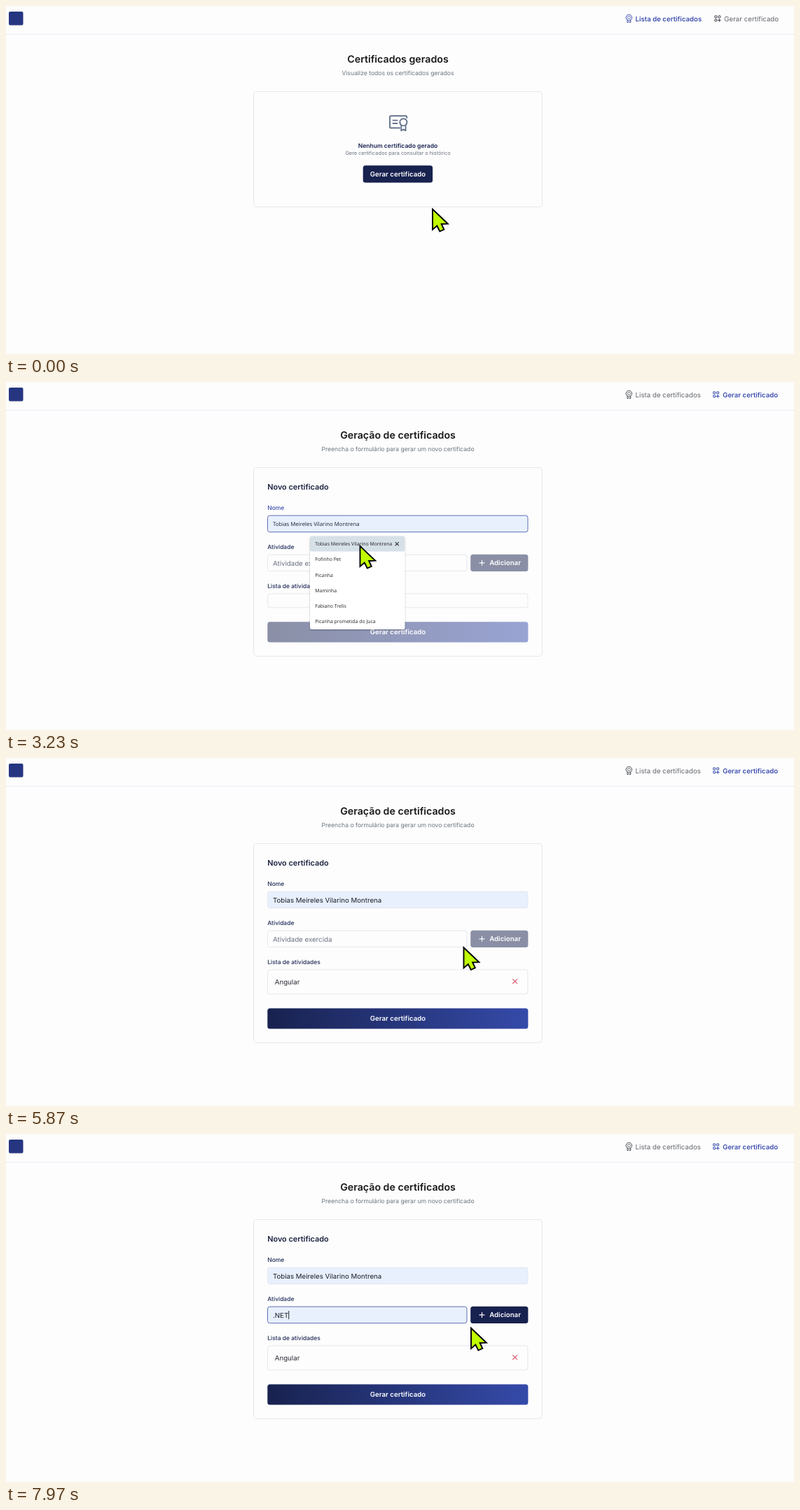
An HTML page that plays this animation: 1125 px wide and 498 px high, repeating every 8 s.

```html
<!DOCTYPE html>
<html lang="pt-BR">
<head>
<meta charset="utf-8">
<title>Certificados</title>
<style>
  html, body { margin: 0; width: 100%; height: 100%; overflow: hidden; background: #fdfdfd; }
  svg { display: block; width: 100vw; height: 100vh; }
  text { font-family: Inter, "Liberation Sans", sans-serif; text-rendering: geometricPrecision; white-space: pre; }
  .sys { font-family: "Open Sans", "Noto Sans", sans-serif; }
</style>
</head>
<body>
<svg id="stage" viewBox="0 0 1125 498" xmlns="http://www.w3.org/2000/svg"></svg>
<script>
const LOOP = 8000;
const NAVY = '#18224f', ACCENT = '#3f4fb0', GRAY = '#6b7280', BORDER = '#e5e7ee';
const STUDENT = 'Tobias Meireles Vilarino Montrena';
const STUDENTS = [STUDENT, 'Fofinho Pet', 'Picanha', 'Maminha', 'Fabiano Trelis', 'Picanha prometida do Juca'];
const ACTIVITIES = ['Angular', 'sa', 'asas', 'Nimbora', '.NET'];
const ROW = 22.1;

// Moments of the user's actions, in ms
const AT = {
  hover: 1380, page: 1600, nameFocus: 2530, namePick: 3530,
  firstFocus: 3680, firstPick: 4500, add: 4970,
  secondFocus: 6200, secondPick: 7830
};

// Pointer path: time, x, y
const PATH = [
  [0, 608.5, 290], [1270, 608.5, 290], [1430, 580.3, 231], [1700, 580.3, 231],
  [2100, 551.5, 209.5], [2900, 551.5, 209.5], [3230, 505, 234], [3530, 505, 234],
  [3680, 494, 258], [4000, 480, 262], [4130, 458.5, 278.5], [4200, 458.5, 278.5],
  [4300, 462, 284], [4510, 462, 284], [4830, 703, 257], [5640, 703, 257],
  [5870, 653, 270.5], [6080, 510, 259], [6530, 510, 259], [6800, 506.5, 284],
  [6970, 506.5, 303], [7330, 506.5, 353], [7600, 505, 377], [7820, 505, 377],
  [7970, 663.5, 277], [8000, 663.5, 277]
];

// Pointer shape from each time on
const SHAPES = [
  [0, 'arrow'], [1370, 'hand'], [1600, 'arrow'], [1930, 'beam'], [3000, 'arrow'],
  [3610, 'beam'], [4060, 'arrow'], [4760, 'hand'], [4990, 'arrow'],
  [5900, 'beam'], [6680, 'arrow']
];

const stage = document.getElementById('stage');
const ruler = document.createElement('canvas').getContext('2d');

const clamp = v => Math.max(0, Math.min(1, v));
const ramp = (t, start, span) => clamp((t - start) / span);
const within = (t, a, b) => t >= a && t < b;

function pointer(t) {
  const i = Math.max(1, PATH.findIndex(p => p[0] >= t));
  const [ta, xa, ya] = PATH[i - 1], [tb, xb, yb] = PATH[i];
  const k = ramp(t, ta, tb - ta), e = k * k * (3 - 2 * k);
  return { x: xa + (xb - xa) * e, y: ya + (yb - ya) * e };
}

function text(x, y, size, str, fill, weight = 400, more = '') {
  return `<text x="${x}" y="${y}" font-size="${size}" fill="${fill}" font-weight="${weight}" ${more}>${str}</text>`;
}
const centered = (y, size, str, fill, weight) =>
  text(559.5, y, size, str, fill, weight, 'text-anchor="middle"');

function box(x, y, w, h, fill, stroke = 'none', r = 3.5, more = '') {
  return `<rect x="${x}" y="${y}" width="${w}" height="${h}" rx="${r}" fill="${fill}" stroke="${stroke}" ${more}/>`;
}

function line(d, color, width, more = '') {
  return `<path d="${d}" fill="none" stroke="${color}" stroke-width="${width}" stroke-linecap="round" stroke-linejoin="round" ${more}/>`;
}

const cross = (x, y, r, color, w) =>
  line(`M${x - r} ${y - r}l${2 * r} ${2 * r}M${x + r} ${y - r}l${-2 * r} ${2 * r}`, color, w);

const DEFS = `<defs>
  <linearGradient id="deep"><stop stop-color="${NAVY}"/><stop offset="1" stop-color="#354aa9"/></linearGradient>
  <filter id="soft" x="-10%" y="-10%" width="120%" height="125%">
    <feDropShadow dx="0" dy="1" stdDeviation="1.3" flood-color="#000" flood-opacity=".3"/>
  </filter></defs>`;

function medalIcon(color) {
  return `<g fill="none" stroke="${color}"><circle cx="889.4" cy="16.6" r="4.2"/><circle cx="889.4" cy="16.6" r="2" stroke-width=".8"/></g>`
    + line('M887 20.2v3.6l2.4-1.2 2.4 1.2v-3.6', color, 1);
}

function gridIcon(x, color) {
  const dot = (dx, dy) => `<circle cx="${x + dx}" cy="${dy}" r="1.6"/>`;
  return `<g fill="none" stroke="${color}" stroke-width="1.1">${dot(2.2, 15.4)}${dot(7.2, 15.4)}${dot(2.2, 20.4)}</g>`
    + line(`M${x + 5.4} 20.4h3.6m-1.8-1.8v3.6`, color, 1.1);
}

function header(onForm) {
  const link = (x, str, active) => text(x, 21.5, active ? 9.63 : 9.72, str, active ? ACCENT : '#62656c', active ? 600 : 400);
  return box(4, 8, 20.5, 19.5, '#26357f', 'none', 2)
    + '<path d="M0 40.5H1125" stroke="#e9eafa"/>'
    + medalIcon(onForm ? '#4a4d55' : ACCENT)
    + link(898.6, 'Lista de certificados', !onForm)
    + gridIcon(onForm ? 1009 : 1011.2, onForm ? ACCENT : '#4a4d55')
    + link(onForm ? 1023.2 : 1025.3, 'Gerar certificado', onForm);
}

function heading(title, sub) {
  return centered(81, 14.2, title, '#18181b', 600) + centered(99.1, 8.6, sub, GRAY);
}

const card = h => box(353.5, 122.5, 412, h, '#fdfdfd', BORDER, 4.5);

function emptyPage(t) {
  const slate = '#64748b';
  return heading('Certificados gerados', 'Visualize todos os certificados gerados') + card(165)
    + line('M562 174.5h-12.4a1.6 1.6 0 0 1-1.6-1.6v-14a1.6 1.6 0 0 1 1.6-1.6h21a1.6 1.6 0 0 1 1.6 1.6v1.2M552.5 163.6h6M552.5 168h6', slate, 1.9)
    + `<circle cx="567.4" cy="166.3" r="5.1" fill="none" stroke="${slate}" stroke-width="1.9"/>`
    + line('M564.2 171v7.4l3.2-1.8 3.2 1.8v-7.4', slate, 1.8)
    + centered(203, 8.57, 'Nenhum certificado gerado', NAVY, 600)
    + centered(213.4, 7.33, 'Gere certificados para consultar o histórico', GRAY)
    + box(509.7, 228.3, 99.4, 24.4, NAVY, 'none', 3.5, `opacity="${1 - .1 * ramp(t, AT.hover, 50)}"`)
    + centered(244, 9.66, 'Gerar certificado', '#fff', 600);
}

function field(y, w, { value, preview, hint, focus, blink }) {
  const shown = value || preview;
  let out = box(373.5, y + .5, w, 23.6, shown ? '#e8f0fe' : '#fdfdfd', focus ? '#5f6eb8' : BORDER, 3.2);
  if (value) out += text(381, y + 15.9, 9.68, value, '#1b1d26');
  else if (preview) out += text(381, y + 15.4, 7.8, preview, '#1b1d26', 400, 'class="sys"');
  else out += text(381, y + 15.9, 9.7, hint, GRAY);
  if (focus && blink && (value || !preview)) {
    ruler.font = '9.68px Inter, "Liberation Sans", sans-serif';
    const x = 381.6 + (value ? ruler.measureText(value).width : 0);
    out += `<path d="M${x} ${y + 6.5}v12" stroke="#111" stroke-width=".9"/>`;
  }
  return out;
}

function popup(y, w, items, row) {
  const h = items.length * ROW + .9;
  let out = `<g filter="url(#soft)"><path d="M442 ${y + .5}l5.5-4 5.5 4z" fill="#fff"/>${box(434, y, w, h, '#fff', 'none', 3)}</g>`;
  if (row >= 0) {
    out += box(434, y + row * ROW, w, ROW, '#d6e0e7', 'none', row ? 0 : 2.5)
      + cross(434 + w - 11.2, y + row * ROW + 11.2, 2.3, '#30353b', 1.1);
  }
  items.forEach((s, i) => {
    out += text(441.3, y + 13.9 + i * ROW, 6.95, s, '#202226', 400, 'class="sys"');
  });
  return out;
}

// Row under the pointer a short while ago, or -1
function rowAt(t, opened, y, count, lag) {
  if (t - lag < opened) return -1;
  const r = Math.floor((pointer(t - lag).y - y) / ROW);
  return r >= 0 && r < count ? r : -1;
}

function formPage(t) {
  const named = t >= AT.namePick, listed = t >= AT.add;
  const nameOpen = within(t, AT.nameFocus, AT.namePick);
  const firstOpen = within(t, AT.firstFocus, AT.firstPick);
  const actOpen = firstOpen || within(t, AT.secondFocus, AT.secondPick);
  const actOpened = firstOpen ? AT.firstFocus : AT.secondFocus;
  const nameFocus = within(t, AT.nameFocus, AT.firstFocus);
  const actFocus = within(t, AT.firstFocus, AT.add) || t >= AT.secondFocus;
  const value = within(t, AT.firstPick, AT.add) ? 'Angular' : t >= AT.secondPick ? '.NET' : '';
  const grow = listed ? 15 : 0;

  const typedAt = [AT.nameFocus, AT.namePick, AT.firstFocus, AT.firstPick, AT.secondFocus, AT.secondPick].filter(a => a <= t).pop() || 0;
  const blink = (t - typedAt) % 1000 < 500;

  const nameRow = nameOpen ? rowAt(t, AT.nameFocus + 400, 220.4, 6, 60) : -1;
  const actRow = actOpen ? rowAt(t, actOpened, 276.5, 5, 60) : -1;
  const previewRow = actOpen ? rowAt(t, actOpened, 276.5, 5, 120) : -1;

  const ready = ramp(t, AT.firstPick, 110) - ramp(t, AT.add, 150) + ramp(t, AT.secondPick, 110);
  const hovered = .1 * ramp(t, 4770, 60) * (1 - ramp(t, AT.add, 60));
  const label = (y, s, color = '#222c58') => text(373.3, y, 8.47, s, color, 500);

  let out = heading('Geração de certificados', 'Preencha o formulário para gerar um novo certificado')
    + card(270 + grow)
    + text(373.2, 154.2, 10.9, 'Novo certificado', '#1b2040', 600)
    + label(182.6, 'Nome', nameFocus ? ACCENT : undefined)
    + field(190.6, 371.5, {
        value: named ? STUDENT : '', preview: nameRow >= 0 ? STUDENTS[nameRow] : '',
        hint: 'Nome do aluno', focus: nameFocus, blink })
    + label(238.6, 'Atividade')
    + field(246.6, 284.5, {
        value, preview: previewRow >= 0 ? ACTIVITIES[previewRow] : '',
        hint: 'Atividade exercida', focus: actFocus, blink })
    + box(663.2, 246.7, 82.2, 24.3, NAVY, 'none', 3.5, `opacity="${.5 + .5 * ready - hovered}"`)
    + line('M676 258.9h7m-3.5-3.5v7', '#fff', 1.1)
    + text(690.2, 262.4, 9.68, 'Adicionar', '#fff', 600)
    + label(294.5, 'Lista de atividades')
    + box(373.5, 302.9, 371.5, 20 + grow, '#fdfdfd', BORDER, 3.5);
  if (listed) out += text(383.7, 324.2, 9.72, 'Angular', '#2a2d36') + cross(726.6, 319.6, 3, '#d4556c', 1.2);
  out += box(373.3, 343.2 + grow, 372.1, 29.4, 'url(#deep)', 'none', 3.5, `opacity="${.5 + .5 * ramp(t, AT.add, 150)}"`)
    + centered(361.4 + grow, 9.66, 'Gerar certificado', '#fff', 600);
  if (nameOpen) out += popup(220.4, 135.4, STUDENTS, nameRow);
  if (actOpen) out += popup(276.5, 96, ACTIVITIES, actRow);
  return out;
}

const LIME = '#c0ff00';
const CURSORS = {
  arrow: `<path d="M.5.8V30l6.3-5.5 4 8 6-2.7-3.7-7.8 9.2-.3z" fill="${LIME}" stroke="#000" stroke-width="1.9"/>`,
  hand: `<path d="M-2.8 21.5V3A2.8 2.8 0 0 1 2.8 3V11.5A2.6 2.6 0 0 1 8 11.5V12.6A2.5 2.5 0 0 1 13 13V14.8A2.4 2.4 0 0 1 17.8 15V26C17.8 34 13.5 38.4 7.5 38.4C2 38.4-1 36-3.5 32L-11.2 23.4C-13-21 -13 21-11.2 20C-9.5 18.4-7.4 18.8-5.6 20.6L-2.8 23.4Z" fill="${LIME}" stroke="#000" stroke-width="1.9" stroke-linejoin="round"/>`.replace('C-13-21 -13 21-11.2 20', 'C-12.6 22-12.4 20.8-11.2 20')
    + line('M2.8 11.5v7M8 12v6.5M13 13.5v5.5', '#000', 1.7),
  beam: ['#000 6', LIME + ' 2.2'].map(s => {
    const [c, w] = s.split(' ');
    return `<path d="M-7-13.3H7M0-13.3V13.3M-7 13.3H7" fill="none" stroke="${c}" stroke-width="${w}" stroke-linecap="square"/>`;
  }).join('')
};

function cursor(t) {
  const { x, y } = pointer(t);
  const shape = SHAPES.filter(s => s[0] <= t).pop()[1];
  return `<g transform="translate(${x.toFixed(2)} ${y.toFixed(2)})">${CURSORS[shape]}</g>`;
}

let last = '';
function draw(t) {
  const onForm = t >= AT.page;
  const markup = DEFS + header(onForm) + (onForm ? formPage(t) : emptyPage(t)) + cursor(t);
  if (markup !== last) stage.innerHTML = last = markup;
}

const start = performance.now();
function tick() {
  draw((performance.now() - start) % LOOP);
  requestAnimationFrame(tick);
}
draw(0);
requestAnimationFrame(tick);
</script>
</body>
</html>
```
